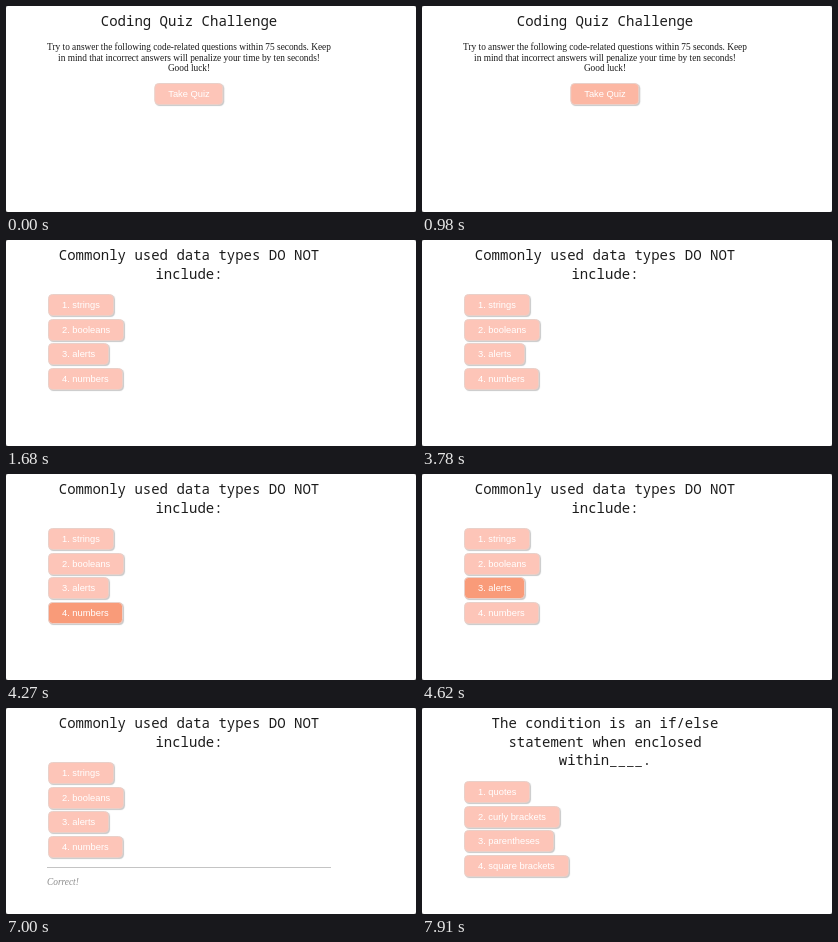
An HTML page that plays this animation: 410 px wide and 206 px high, repeating every 8000 ms.

```html
<!DOCTYPE html>
<html lang="en">
<head>
<meta charset="utf-8">
<title>Coding Quiz</title>
<style>
html, body { margin: 0; width: 100%; height: 100%; overflow: hidden; background: #666; }
#stage { position: relative; width: 410px; height: 206px; background: #fff; border-radius: 2px; overflow: hidden; }
#stage div { position: absolute; white-space: pre; }
#stage .page { inset: 0; }
#stage h1, #stage p { position: absolute; left: 0; width: 366px; margin: 0; text-align: center; white-space: pre; }
h1 { top: 6px; font: 300 14px/18.5px "Roboto Mono", "Noto Sans Mono", monospace; color: #1c1c1c; }
.blank { font-size: 11px; line-height: 1; letter-spacing: 1.8px; position: relative; left: .9px; }
p { top: 36px; font: 9.33px/10.5px "Liberation Serif", Times, serif; color: #1a1a1a; }
.btn {
  box-sizing: border-box; height: 22px; padding: 0 13px;
  border: 1px solid #e9d0c9; border-radius: 4.5px; box-shadow: 1px 1px 1px #c9c9c9;
  background: color-mix(in srgb, #f99b79 calc(var(--hover, 0) * 100%), #fdc5b8); color: #fff;
  font: 9.33px/20px "Liberation Sans", Arial, sans-serif;
}
.btn.pressed { box-shadow: 0 0 1px #b5aeab; }
#start { left: 183px; top: 76.5px; transform: translateX(-50%); }
#result { left: 41px; top: 158.5px; width: 284px; border-top: 1px solid #c4c4c4; }
#result div { top: 9px; font: italic 9.33px/10.5px "Liberation Serif", Times, serif; color: #8a8a8a; }
</style>
</head>
<body>
<div id="stage">
  <div class="page"><h1>Coding Quiz Challenge</h1><p>Try to answer the following code-related questions within 75 seconds. Keep
in mind that incorrect answers will penalize your time by ten seconds!
Good luck!</p><div class="btn" id="start">Take Quiz</div></div>
</div>
<script>
const LOOP = 8000, STEP = 70;
const stage = document.getElementById('stage');

function add(parent, tag, cls, html) {
  const el = document.createElement(tag);
  el.className = cls;
  el.innerHTML = html;
  return parent.appendChild(el);
}

function question(title, top, answers) {
  const page = add(stage, 'div', 'page', '');
  add(page, 'h1', '', title);
  const buttons = answers.map((answer, i) => {
    const b = add(page, 'div', 'btn', `${i + 1}. ${answer}`);
    b.style.left = '42px';
    b.style.top = top + i * 24.5 + 'px';
    return b;
  });
  return { page, buttons };
}

const intro = stage.firstElementChild;
const start = document.getElementById('start');
const first = question('Commonly used data types DO NOT\ninclude:', 54,
  ['strings', 'booleans', 'alerts', 'numbers']);
const second = question('The condition is an if/else\nstatement when enclosed\nwithin<span class="blank">____</span>.', 73,
  ['quotes', 'curly brackets', 'parentheses', 'square brackets']);
const result = add(first.page, 'div', '', '');
result.id = 'result';
add(result, 'div', '', 'Correct!');

// Fade by equal steps; the first step shows at time `from`.
const fade = (t, from, steps) =>
  Math.max(0, Math.min(1, (Math.floor((t - from) / STEP) + 1) / steps));
const show = (el, on) => { el.style.visibility = on ? 'visible' : 'hidden'; };

function paint(el, hover, pressed) {
  el.style.setProperty('--hover', hover);
  el.classList.toggle('pressed', pressed);
}

function draw(t) {
  const [, , alerts, numbers] = first.buttons;
  show(intro, t < 1470);
  show(first.page, t >= 1470 && t < 7140);
  show(second.page, t >= 7140);
  show(result, t >= 5460 && t < 7140);
  paint(start, fade(t, 980, 3), t >= 1330 && t < 1470);
  paint(numbers, fade(t, 3920, 3) - fade(t, 4550, 2), false);
  paint(alerts, fade(t, 4550, 2) - fade(t, 6440, 3), t >= 5320 && t < 5460);
}

const origin = performance.now();
function tick() {
  draw((performance.now() - origin) % LOOP);
  requestAnimationFrame(tick);
}
tick();
</script>
</body>
</html>
```
